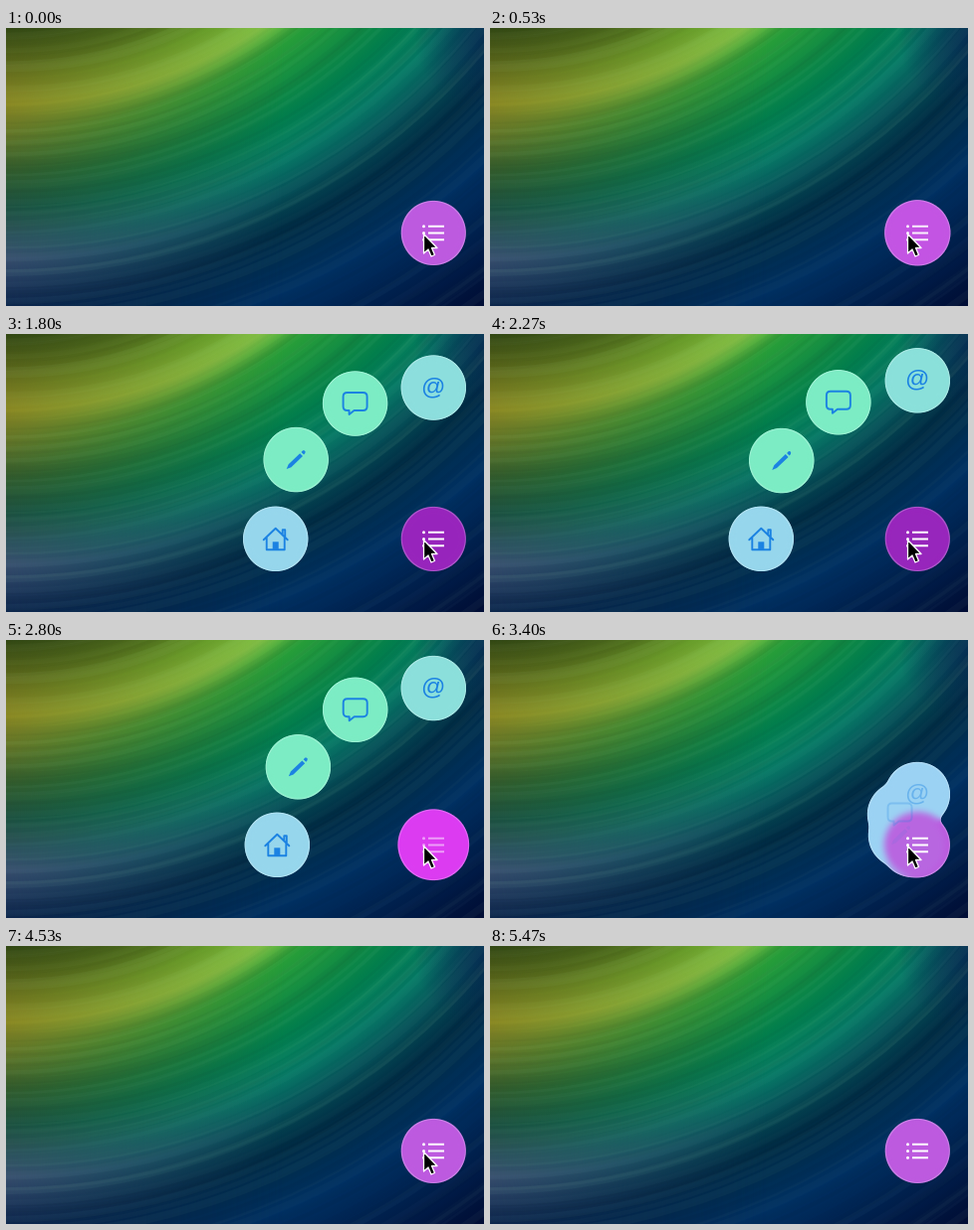
Animation, 480 px wide and 280 px high, one loop 5540 ms. Source, as an HTML page:

```html
<!DOCTYPE html>
<html lang="en">
<head>
<meta charset="utf-8">
<title>Gooey menu</title>
<style>
  html, body { margin: 0; width: 100%; height: 100%; overflow: hidden; background: #02203f; }
  .layer, svg { position: absolute; left: 0; top: 0; width: 480px; height: 280px; }
  .warm {
    background: radial-gradient(circle 840px at 0 -380px,
      #324814 380px, #8c8a24 456px, #325c2e 525px, #1c5040 560px, #385070 612px, #08224a 664px);
  }
  .cool {
    background:
      radial-gradient(circle 75px at 485px 10px, #062652d0, #06265200),
      radial-gradient(circle 840px at 0 -380px,
        #3e5c18 380px, #64ac2e 430px, #82c64a 458px, #289e38 482px, #027e4c 545px,
        #047a64 580px, #06545a 610px, #002c44 645px, #003062 705px, #000c34 815px);
    -webkit-mask-image: linear-gradient(90deg, transparent, #000 280px);
    mask-image: linear-gradient(90deg, transparent, #000 280px);
  }
  .icon { fill: none; stroke: #1b82e2; stroke-width: 1.9; stroke-linejoin: round; stroke-linecap: round; }
  .icon text { font: 24px "Liberation Sans", sans-serif; text-anchor: middle; }
  .icon text, .icon .solid { fill: #1b82e2; stroke: none; }
  #list { stroke: #fff; stroke-width: 2; fill: #fff; }
  #list circle { stroke: none; }
</style>
</head>
<body>
<div class="layer warm"></div>
<div class="layer cool"></div>
<svg viewBox="0 0 480 280">
  <defs>
    <filter id="goo" filterUnits="userSpaceOnUse" x="0" y="0" width="480" height="280" color-interpolation-filters="sRGB">
      <feGaussianBlur stdDeviation="3"/>
      <feColorMatrix values="1 0 0 0 0  0 1 0 0 0  0 0 1 0 0  0 0 0 10 -4.5" result="blob"/>
      <feMorphology in="blob" operator="erode" radius="1" result="inner"/>
      <feFlood flood-color="#fff" flood-opacity=".22"/>
      <feComposite in2="blob" operator="in"/>
      <feComposite in2="inner" operator="out" result="rim"/>
      <feMerge><feMergeNode in="blob"/><feMergeNode in="rim"/></feMerge>
    </filter>
  </defs>
  <g id="streaks" fill="none"></g>
  <g id="blobs" filter="url(#goo)"></g>
  <g class="icon">
    <path d="M-12 1 L0 -10.5 L12 1 M-9 -1 V11 H9 V-1 M7 -4.5 V-9 H9.5 V-2"/>
    <rect class="solid" x="-3" y="3" width="6" height="8.5"/>
  </g>
  <g class="icon">
    <path class="solid" d="M-9.5 9.5 L-7.5 4.8 L4 -6.4 L6.8 -3.6 L-4.8 7.6 Z M5.3 -7.6 L7 -9.2 Q8.6 -9.8 9.4 -8.2 L9.2 -6.6 L7.9 -5 Z"/>
  </g>
  <g class="icon">
    <path d="M-8 -11 H8 Q12 -11 12 -7 V3 Q12 7 8 7 H-1 L-6 11 V7 H-8 Q-12 7 -12 3 V-7 Q-12 -11 -8 -11 Z"/>
  </g>
  <g class="icon"><text y="6.5">@</text></g>
  <g id="list">
    <circle cx="419.5" cy="199.7" r="1.5"/><circle cx="419.5" cy="206.5" r="1.5"/><circle cx="419.5" cy="213.2" r="1.5"/>
    <path d="M424 199.7 H440 M424 206.5 H440 M424 213.2 H440"/>
  </g>
  <path id="cursor" d="M419.5 207.5 V227 L424 223 L427 230 L430.5 228.5 L427.5 221.5 H433 Z"
    fill="#000" stroke="#fff" stroke-width="1.3" stroke-linejoin="round"/>
</svg>
<script>
const LOOP = 5540, STEP = 1000 / 15;
const HOME = { x: 429.3, y: 206.3 }, REACH = 157;
const OPEN_AT = 795, CLOSE_AT = 2840, CURSOR_OUT = 5000;
const CLOSED = [189, 90, 224], OPENED = [152, 38, 188], PRESSED = [220, 60, 242];
const MINT = [124, 236, 196], SKY = [155, 210, 243];

const $ = id => document.getElementById(id);
function add(parent, attrs) {
  const circle = document.createElementNS("http://www.w3.org/2000/svg", "circle");
  set(circle, attrs);
  return parent.appendChild(circle);
}
function set(node, attrs) {
  for (const name in attrs) node.setAttribute(name, attrs[name]);
}

const clamp = v => Math.min(1, Math.max(0, v));
const mix = (a, b, k) => a.map((v, i) => v + (b[i] - v) * k);
const rgb = values => `rgb(${values.map(Math.round)})`;
const pulse = (time, peak) => Math.exp(-(((time - peak) / 200) ** 2));

function spring(ms, period) {
  if (ms <= 0) return 0;
  const a = ms / period, damp = 1.316;
  return 1 - Math.exp(-damp * a) * (Math.cos(a) + damp * Math.sin(a));
}
const openness = (time, period) => spring(time - OPEN_AT, period) - spring(time - CLOSE_AT, period);

let seed = 11;
const random = () => (seed = seed * 16807 % 2147483647) / 2147483647;
for (let r = 380; r < 830; r += 2 + random() * 6) {
  add($("streaks"), {
    cx: random() * 16 - 8, cy: -380, r, stroke: random() < .5 ? "#000" : "#bff5c0",
    "stroke-width": 2 + random() * 7, opacity: .01 + random() * .025
  });
}

// Every further item swings a little slower.
const items = [...document.querySelectorAll(".icon")].map((icon, i) => ({
  icon, angle: i * Math.PI / 6, period: 260 + 68 * i, blob: add($("blobs"), { r: 33 })
}));
const button = add($("blobs"), { cx: HOME.x, cy: HOME.y, "fill-opacity": .88 });

function draw(time) {
  for (const { icon, angle, period, blob } of items) {
    const out = openness(time, period);
    const x = HOME.x - REACH * out * Math.cos(angle);
    const y = HOME.y - REACH * out * Math.sin(angle);
    // The tint follows the backdrop: mint over the green arc, sky over navy.
    const navy = Math.sqrt(clamp((Math.hypot(x, y + 380) - 588) / 80));
    set(blob, { cx: x, cy: y, fill: rgb(mix(MINT, SKY, navy)), visibility: out > .01 ? "visible" : "hidden" });
    set(icon, { transform: `translate(${x} ${y})`, opacity: clamp(out * 1.5 - .1) });
  }
  const press = pulse(time, OPEN_AT) + pulse(time, CLOSE_AT - 40);
  const tint = mix(CLOSED, OPENED, openness(time, 260));
  set(button, { r: 33.4 + 3.3 * press, fill: rgb(mix(tint, PRESSED, press)) });
  set($("list"), { opacity: 1 - press / 2 });
  set($("cursor"), { visibility: time < CURSOR_OUT ? "visible" : "hidden" });
}

const start = performance.now();
function tick() {
  const time = (performance.now() - start) % LOOP;
  draw(Math.floor((time + 4) / STEP) * STEP);
  requestAnimationFrame(tick);
}
draw(0);
requestAnimationFrame(tick);
</script>
</body>
</html>
```
